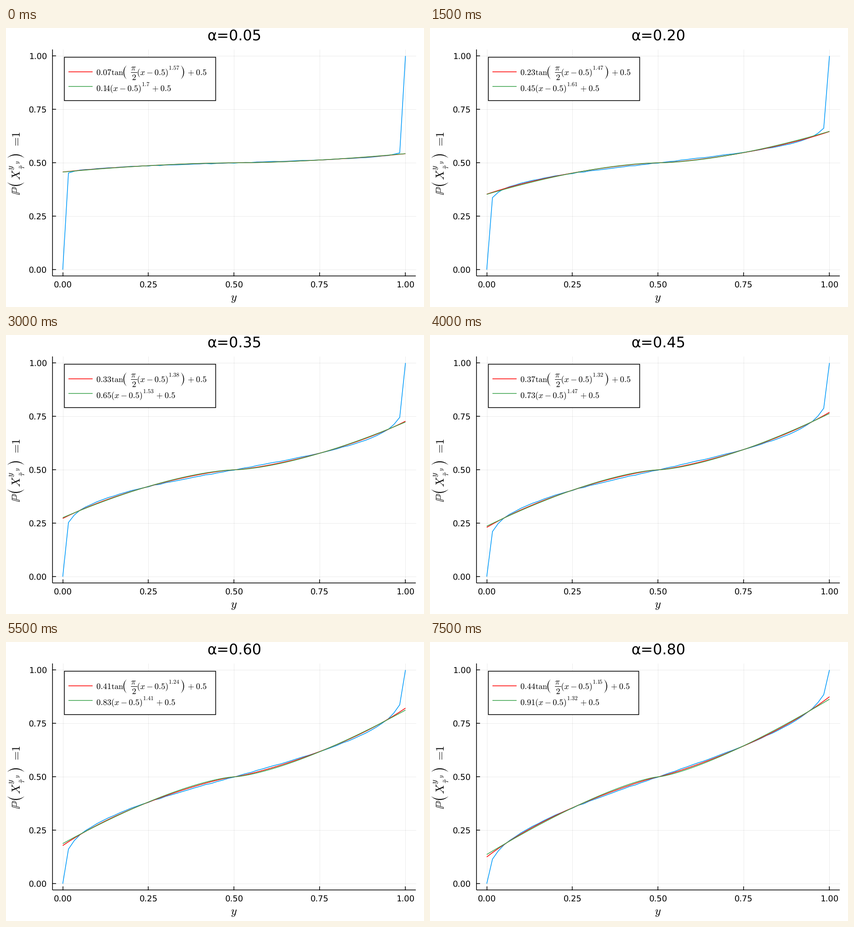
Animation, 917 px wide and 611 px high, one loop 8 s. Source, as a matplotlib script:

```python
import matplotlib.pyplot as plt
import numpy as np
from matplotlib.animation import FuncAnimation
from matplotlib.patches import PathPatch, Rectangle
from matplotlib.path import Path
from matplotlib.textpath import TextPath
from matplotlib.transforms import Affine2D

W, H, DPI = 917, 611, 100
PT = 72 / DPI
TICK, GUIDE, TITLE = 18.4, 25.3, 32.2
SUP = 0.7
LINE = 1.55 * PT
BLUE, RED, GREEN = "#009afa", "#ff0000", "#3da44d"

plt.rcParams.update({
    "font.family": "DejaVu Sans",
    "mathtext.fontset": "cm",
    "text.hinting": "none",
    "text.hinting_factor": 1,
})

# Fitted coefficients for alpha = 0.05, 0.10, ..., 0.80
ALPHA = np.arange(1, 17) * 0.05
TAN_C = [.073, .133, .186, .23, .27, .302, .33, .352,
         .37, .386, .4, .41, .42, .427, .434, .438]
TAN_E = [1.57, 1.54, 1.50, 1.47, 1.44, 1.41, 1.38, 1.35,
         1.32, 1.29, 1.27, 1.24, 1.22, 1.19, 1.17, 1.15]
POW_C = [.14, .26, .366, .45, .526, .59, .646, .69,
         .73, .768, .8, .83, .852, .873, .89, .907]
POW_E = [1.70, 1.67, 1.64, 1.61, 1.58, 1.56, 1.53, 1.50,
         1.47, 1.45, 1.43, 1.41, 1.38, 1.36, 1.34, 1.32]


def px(v):
    return 124.5 + 751.8 * np.asarray(v)


def py(v):
    return H - 529.3 + 468 * np.asarray(v)


def math(s, x, y, size):
    """Outline of a formula with its origin at pixel (x, y), y downwards."""
    return TextPath((x, H - y), f"${s}$", size=size)


def paren(x, y, w, h, thick, right=False):
    """Tall parenthesis centred vertically on y."""
    a, b = -w / 3, -w / 3 + thick * 4 / 3
    pts = np.array([(w, h / 2), (a, h / 4), (a, -h / 4), (w, -h / 2),
                    (b, -h / 4), (b, h / 4), (w, h / 2)])
    if right:
        pts[:, 0] = w - pts[:, 0]
    return Path(pts + (x, H - y), [Path.MOVETO] + [Path.CURVE4] * 6)


def bar(x0, x1, y, thick):
    lo, hi = H - y - thick / 2, H - y + thick / 2
    return Path([(x0, lo), (x1, lo), (x1, hi), (x0, hi), (x0, lo)], closed=True)


def number(v):
    return f"{round(v, 2):g}"


def tight(s):
    """Close the gap after a 1 that is followed by another digit."""
    return "".join(a + r"\!" if a == "1" and b.isdigit() else a
                   for a, b in zip(s, s[1:] + " "))


def advance(s, size):
    digits = sum(ch.isdigit() for ch in s)
    pairs = tight(s).count("!")
    return size * (0.5 * digits + 0.278 * ("." in s) - 0.15 * pairs)


def tan_label(c, e):
    c, e = number(c), number(e)
    x = 198.4 + advance(c, TICK)
    s = x + 126
    end = s + advance(e, TICK * SUP)
    parts = [
        math(tight(c), 198.4, 103, TICK),
        math(r"\mathrm{tan}", x + 0.4, 103, 17.6),
        paren(x + 26.3, 97, 7.5, 31, 1.8),
        math(r"\pi", x + 43, 93, TICK),
        bar(x + 43, x + 57, 97.5, 1),
        math("2", x + 45.3, 114, TICK),
        math("(x-0.5)", x + 56.3, 103, TICK),
        math(tight(e), s, 91.3, TICK * SUP),
        paren(end + 3.2, 97, 7.5, 31, 1.8, right=True),
        math("+", end + 18.8, 103, TICK),
        math("0.5", end + 36.8, 103, TICK),
    ]
    return parts, end + 80


def pow_label(c, e):
    c, e = number(c), number(e)
    x = 198.4 + advance(c, TICK)
    s = x + 69.8
    end = s + advance(e, TICK * SUP)
    return [
        math(tight(c), 198.4, 138, TICK),
        math("(x-0.5)", x - 0.3, 138, TICK),
        math(tight(e), s, 127.2, TICK * SUP),
        math("+", end + 6, 138, TICK),
        math("0.5", end + 24.2, 138, TICK),
    ]


def y_guide():
    parts = [
        math(r"\mathbb{P}", 0, H, 26),
        paren(20, H - 8.5, 8.5, 38, 2.2),
        math("X", 33, H, GUIDE),
        math("y", 55, H - 16, GUIDE * SUP),
        math(r"\tilde{\tau}", 56.5, H + 10, GUIDE * SUP),
        math("y", 68, H - 2.6, GUIDE * SUP ** 2),
        paren(81, H - 8.5, 8.5, 38, 2.2, right=True),
        math("=", 102.5, H, GUIDE),
        math("1", 126, H, GUIDE),
    ]
    turn = Affine2D().rotate_deg(90).translate(30, H - 366)
    return Path.make_compound_path(*parts).transformed(turn)


fig = plt.figure(figsize=(W / DPI, H / DPI), dpi=DPI, facecolor="white")
ax = fig.add_axes([0, 0, 1, 1])
ax.set(xlim=(0, W), ylim=(0, H))
ax.axis("off")


def stroke(xs, ys, color="black", width=LINE, **kw):
    return ax.plot(xs, ys, color=color, lw=width, **kw)[0]


def ink(path, z=6):
    return ax.add_patch(PathPatch(path, fc="black", lw=0, zorder=z))


def label(x, y, s, size, ha="center"):
    return ax.text(x, H - y, s, fontsize=size * PT, ha=ha, va="baseline")


LEFT, RIGHT, BOTTOM, TOP = px(-0.03), px(1.03), py(-0.03), py(1.03)
for v in np.linspace(0, 1, 5):
    gx, gy = px(v), py(v)
    stroke([gx, gx], [BOTTOM, TOP], width=0.76 * PT, alpha=0.1, zorder=1)
    stroke([LEFT, RIGHT], [gy, gy], width=0.76 * PT, alpha=0.1, zorder=1)
    stroke([gx, gx], [BOTTOM, BOTTOM + 7], zorder=2)
    stroke([LEFT, LEFT + 7], [gy, gy], zorder=2)
    label(gx, 568, f"{v:.2f}", TICK)
    label(90, H - gy + 6.7, f"{v:.2f}", TICK, ha="right")
stroke([LEFT, RIGHT], [BOTTOM, BOTTOM], zorder=2, solid_capstyle="butt")
stroke([LEFT, LEFT], [BOTTOM, TOP], zorder=2, solid_capstyle="butt")

title = label(px(0.5), 28, "", TITLE)
ink(math("y", 493.5, 597, GUIDE))
ink(y_guide())

box = ax.add_patch(Rectangle((128.4, H - 159), 332, 95, fc="white", ec="black",
                             lw=LINE, zorder=5))
stroke([137, 190], [H - 95.5] * 2, RED, zorder=6, solid_capstyle="butt")
stroke([137, 190], [H - 127.5] * 2, GREEN, zorder=6, solid_capstyle="butt")
legend = ink(math("0", 0, 0, TICK), 7)

grid = np.linspace(0, 1, 61)
fine = np.linspace(0, 1, 241)
noise = np.random.default_rng(4).normal(0, 0.0007, grid.size - 2)
style = dict(zorder=3, solid_capstyle="butt", solid_joinstyle="round")
sim = stroke(px(grid), py(grid), BLUE, **style)
tan_fit = stroke(px(fine), py(fine), RED, **style)
pow_fit = stroke(px(fine), py(fine), GREEN, **style)


def simulated(alpha):
    """Probability curve: a flattened logistic in log-odds of the start."""
    y = grid[1:-1]
    edge = np.minimum(y, 1 - y) - 1 / 60
    slope = alpha / (1.04 + 0.9 * alpha - 0.25 * alpha ** 2)
    slope = slope * (1 + 0.1 * (1 - np.exp(-edge / 0.09)))
    p = 1 / (1 + (y / (1 - y)) ** -slope)
    return np.concatenate([[0], p + noise, [1]])


def update(i):
    d = fine - 0.5
    tan_y = TAN_C[i] * np.tan(np.pi / 2 * np.abs(d) ** TAN_E[i])
    pow_y = POW_C[i] * np.abs(d) ** POW_E[i]
    sim.set_ydata(py(simulated(ALPHA[i])))
    tan_fit.set_ydata(py(0.5 + np.sign(d) * tan_y))
    pow_fit.set_ydata(py(0.5 + np.sign(d) * pow_y))
    title.set_text(f"α={ALPHA[i]:.2f}")

    parts, right = tan_label(TAN_C[i], TAN_E[i])
    parts += pow_label(POW_C[i], POW_E[i])
    legend.set_path(Path.make_compound_path(*parts))
    box.set_width(right - box.get_x())
    return sim, tan_fit, pow_fit, title, legend, box


anim = FuncAnimation(fig, update, frames=16, interval=500,
                     repeat=True, repeat_delay=0, blit=False)
plt.show()
```
